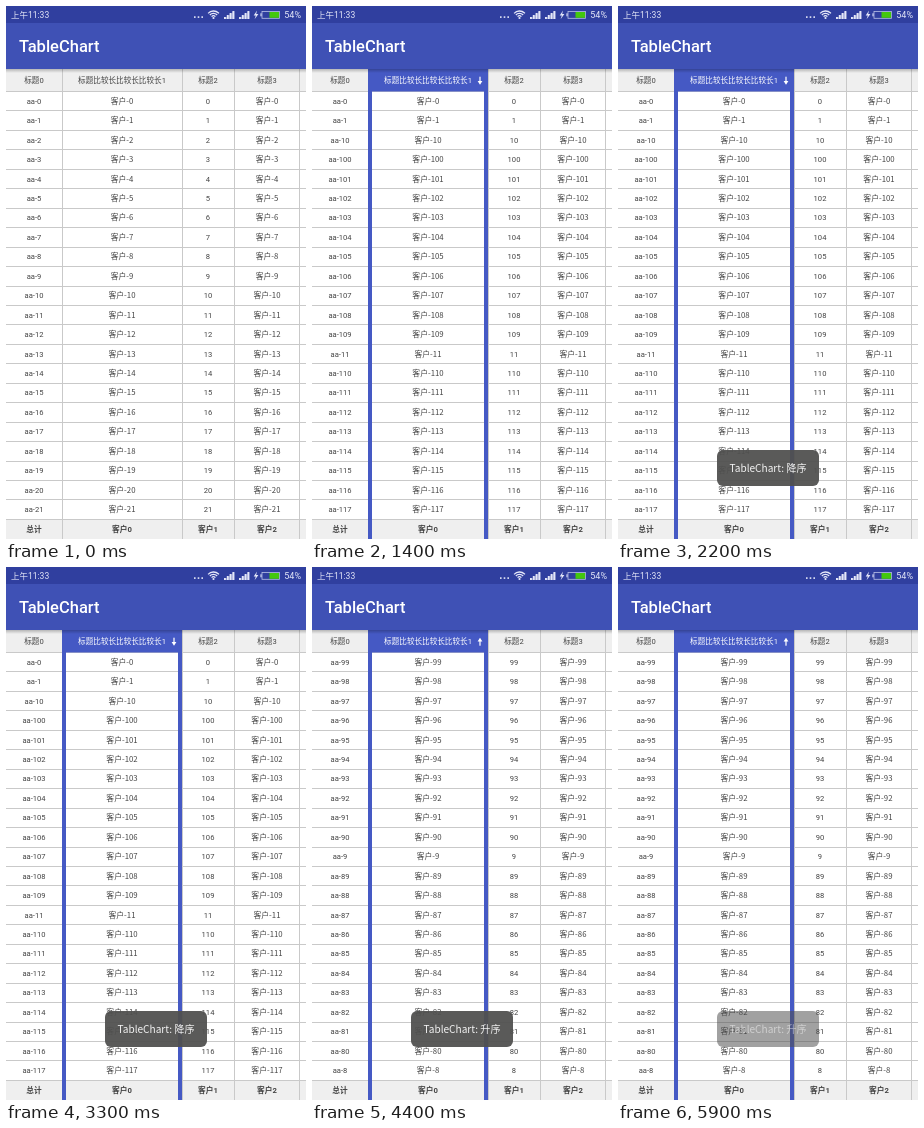
Recreate the animation shown at these times as an HTML page with a canvas. Size 300 by 533 pixels, loop 6000 ms.

```html
<!DOCTYPE html>
<html lang="zh">
<head>
<meta charset="utf-8">
<title>TableChart</title>
<style>
  html, body { margin: 0; width: 100%; height: 100%; overflow: hidden; }
  canvas { display: block; width: 300px; height: 533px; }
</style>
</head>
<body>
<canvas id="stage"></canvas>
<script>
const W = 300, H = 533, LOOP = 6000;
const LATIN = 'Roboto, "Noto Sans CJK SC", "Noto Sans CJK", sans-serif';
const CJK = '"Noto Sans CJK SC", "Noto Sans CJK", sans-serif';
const BLUE = '#4559c4', LINE = '#c9c9c9', INK = '#444';

const HEADER_TOP = 63, BODY_TOP = 85.5, ROW_H = 19.45, ROWS = 22;
const FOOTER_TOP = BODY_TOP + ROWS * ROW_H;
const EDGES = [56, 176, 228, 293];
const CENTERS = [28, 116, 202, 261];
const HEADERS = ['标题0', '标题比较长比较长比较长1', '标题2', '标题3'];
const FOOTERS = ['总计', '客户0', '客户1', '客户2'];

const natural = Array.from({ length: 200 }, (_, i) => String(i));
const ascending = [...natural].sort();
const descending = [...ascending].reverse();

const TOASTS = [
  { label: 'TableChart: 降序', start: 1520, end: 3320 },
  { label: 'TableChart: 升序', start: 4020, end: 5750 }
];
const FADE_IN = 350, FADE_OUT = 350;

const canvas = document.getElementById('stage');
const ratio = window.devicePixelRatio || 1;
canvas.width = W * ratio;
canvas.height = H * ratio;
const ctx = canvas.getContext('2d');
ctx.scale(ratio, ratio);

const clamp = v => Math.max(0, Math.min(1, v));

function rect(x, y, w, h, color) {
  ctx.fillStyle = color;
  ctx.fillRect(x, y, w, h);
}

function text(str, x, y, size, { color = INK, align = 'center', weight = 400, family = LATIN } = {}) {
  ctx.font = `${weight} ${size}px ${family}`;
  ctx.textAlign = align;
  ctx.fillStyle = color;
  ctx.fillText(str, x, y);
}

function polygon(points, color) {
  ctx.fillStyle = color;
  ctx.beginPath();
  points.forEach(([x, y]) => ctx.lineTo(x, y));
  ctx.fill();
}

function drawSignal(x) {
  polygon([[x, 13], [x + 10.5, 13], [x + 10.5, 5]], 'rgba(255,255,255,.35)');
  for (let i = 0; i < 4; i++) rect(x + i * 2.8, 11 - i * 2, 1.9, 2 + i * 2, '#e4e7f8');
}

function drawWifi(x, y) {
  ctx.strokeStyle = '#e4e7f8';
  ctx.lineWidth = 1.3;
  for (const radius of [2.6, 5, 7.4]) {
    ctx.beginPath();
    ctx.arc(x, y, radius, -Math.PI * 0.76, -Math.PI * 0.24);
    ctx.stroke();
  }
  ctx.fillStyle = '#e4e7f8';
  ctx.beginPath();
  ctx.arc(x, y - 0.4, 1.1, 0, 7);
  ctx.fill();
}

function drawBars() {
  const shadow = ctx.createLinearGradient(0, 63, 0, 67);
  shadow.addColorStop(0, 'rgba(0,0,0,.24)');
  shadow.addColorStop(1, 'rgba(0,0,0,0)');
  rect(0, 63, W, 4, shadow);
  rect(0, 0, W, 17, '#303f9f');
  rect(0, 17, W, 46, '#3f51b5');
  text('TableChart', 13, 46, 16.5, { color: '#fff', align: 'left', weight: 500 });

  text('上午11:33', 5, 12, 8.5, { color: '#e4e7f8', align: 'left' });
  for (const x of [188, 191.7, 195.4]) rect(x, 10.3, 1.6, 1.6, '#e4e7f8');
  drawWifi(207.5, 12.4);
  drawSignal(218);
  drawSignal(233);
  polygon([[251, 4.5], [247.7, 9.4], [249.8, 9.4], [248.6, 13.3], [252.4, 7.9], [250.2, 7.9]], '#e4e7f8');
  ctx.strokeStyle = '#b9c0e6';
  ctx.lineWidth = 0.8;
  ctx.strokeRect(256, 5.5, 17.5, 6.8);
  rect(254.3, 7.3, 1.5, 3, '#b9c0e6');
  rect(263.5, 6, 9.6, 5.8, '#43c80d');
  text('54%', 295, 12.2, 9, { color: '#e4e7f8', align: 'right' });
}

function drawArrow(up) {
  ctx.save();
  ctx.translate(168, 74.7);
  if (up) ctx.scale(1, -1);
  rect(-0.6, -4, 1.2, 6, '#fff');
  polygon([[-2.4, 0.3], [2.4, 0.3], [0, 4]], '#fff');
  ctx.restore();
}

function drawTable(values, sort) {
  rect(0, 0, W, H, '#fff');
  rect(0, HEADER_TOP, W, BODY_TOP - HEADER_TOP, '#efefef');
  rect(0, FOOTER_TOP, W, H - FOOTER_TOP, '#efefef');
  for (let i = 0; i <= ROWS; i++) rect(0, Math.floor(BODY_TOP + i * ROW_H), W, 1, LINE);
  for (const x of EDGES) rect(x, HEADER_TOP, 1, H - HEADER_TOP, LINE);

  if (sort) {
    rect(56, HEADER_TOP, 120, 22.5, BLUE);
    for (const x of [56, 172]) rect(x, HEADER_TOP, 4, H - HEADER_TOP, BLUE);
    drawArrow(sort === 'up');
  }

  CENTERS.forEach((x, col) => {
    const color = sort && col === 1 ? '#fff' : INK;
    text(HEADERS[col], x, 77.3, 7.6, { color });
    text(FOOTERS[col], x, 526, 7.7, { weight: 700 });
  });

  values.slice(0, ROWS).forEach((value, i) => {
    const y = BODY_TOP + (i + 0.5) * ROW_H + 2.5;
    text('aa-' + value, CENTERS[0], y, 7.6);
    text('客户-' + value, CENTERS[1], y, 7.8, { family: CJK });
    text(value, CENTERS[2], y, 7.6);
    text('客户-' + value, CENTERS[3], y, 7.8, { family: CJK });
  });
}

function drawToast({ label, start, end }, t) {
  const alpha = clamp((t - start) / FADE_IN) * (1 - clamp((t - end) / FADE_OUT));
  if (!alpha) return;
  ctx.save();
  ctx.globalAlpha = alpha;
  ctx.fillStyle = 'rgba(80,80,79,.94)';
  ctx.beginPath();
  ctx.roundRect(99, 444, 102, 36, 6);
  ctx.fill();
  text(label, 150, 466, 10.1, { color: '#f4f4f4', weight: 300, family: CJK });
  ctx.restore();
}

function render(t) {
  if (t < 1400) drawTable(natural, null);
  else if (t < 3900) drawTable(ascending, 'down');
  else drawTable(descending, 'up');
  drawBars();
  TOASTS.forEach(toast => drawToast(toast, t));
}

const began = performance.now();
function frame() {
  render((performance.now() - began) % LOOP);
  requestAnimationFrame(frame);
}
frame();
</script>
</body>
</html>
```
